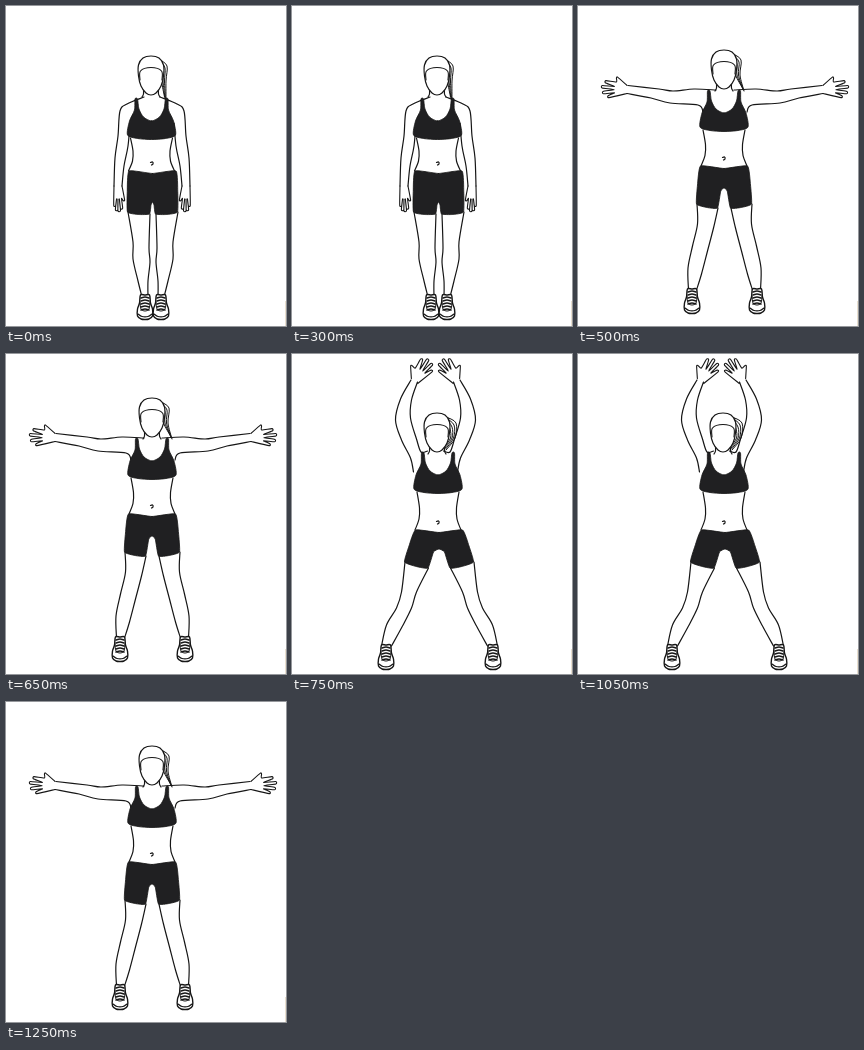
Write an HTML page with a canvas that moves like this. It is 280 px wide and 320 px high and loops after 1.5 s.

```html
<!DOCTYPE html>
<html lang="en">
<head>
<meta charset="utf-8">
<title>Jumping jack</title>
<style>
html, body { margin: 0; width: 100%; height: 100%; overflow: hidden; background: #fff; }
canvas { display: block; width: 280px; height: 320px; }
</style>
</head>
<body>
<canvas id="stage" width="280" height="320"></canvas>
<script>
const ctx = document.getElementById('stage').getContext('2d');
const INK = '#161616', CLOTH = '#202022';
const LOOP = 1500;

// Limb points are [distance from the limb's axis, y]; both sides share them.
const standing = {
  head: [145, 50], chest: [145.5, 115], hips: 165, crotch: 196,
  pony: { bulge: 16, tip: [15, 44] },
  arms: {
    axis: 146,
    outer: [[8, 91], [25, 98], [32, 105], [34, 130], [37, 152], [38, 180]],
    inner: [[22, 117], [24, 140], [28, 160], [30, 180]],
    hand: { at: [34, 180], turn: Math.PI / 2, spread: 0.45, flip: -1 }
  },
  legs: {
    axis: 147, foot: [8, 289],
    outer: [[25, 206], [20, 236], [20, 253], [15, 275], [11, 291]],
    inner: [[3, 208], [4, 242], [3, 256], [5, 275], [5, 291]]
  }
};

const halfway = {
  head: [146, 44], chest: [146, 107], hips: 160, crotch: 182,
  pony: { bulge: 17, tip: [20, 41] },
  arms: {
    axis: 147,
    outer: [[9, 84], [31, 83], [52, 85], [66, 83], [97, 79.5]],
    inner: [[22, 106], [27, 99], [55, 97], [74, 92], [98, 87.5]],
    hand: { at: [98, 83.5], turn: 0, spread: 1, flip: 1 }
  },
  legs: {
    axis: 146.5, foot: [32.5, 283],
    outer: [[27.5, 198], [27, 218], [32, 240], [36.5, 262], [36, 284]],
    inner: [[6.5, 202], [11, 222], [17, 245], [23, 268], [28, 284]]
  }
};

const raised = {
  head: [145, 59], chest: [146, 121], hips: 176, crotch: 195,
  pony: { bulge: 19, tip: [9, 37] },
  arms: {
    axis: 143.5,
    outer: [[24.5, 26], [35, 45], [40, 66], [34, 86], [25, 104], [22, 118]],
    inner: [[18, 28], [24, 46], [25, 64], [19, 85], [14.5, 98], [8, 97]],
    hand: { at: [21, 27], turn: -2.24, spread: 1, flip: -1 }
  },
  legs: {
    axis: 147.5, foot: [53.5, 291],
    outer: [[34.5, 208], [38, 238], [43, 254], [53, 271], [58, 292]],
    inner: [[11, 214], [23, 238], [28, 254], [37, 272], [48, 292]]
  }
};

// Catmull-Rom curve; a larger bend rounds the corners more.
function curve(pts, { closed = false, fill, width = 1.2, bend = 1 / 6 } = {}) {
  const n = pts.length;
  const at = i => closed ? pts[(i + n) % n] : pts[Math.max(0, Math.min(n - 1, i))];
  ctx.beginPath();
  ctx.moveTo(...pts[0]);
  for (let i = 0; i < (closed ? n : n - 1); i++) {
    const [a, b, c, d] = [at(i - 1), at(i), at(i + 1), at(i + 2)];
    ctx.bezierCurveTo(
      b[0] + (c[0] - a[0]) * bend, b[1] + (c[1] - a[1]) * bend,
      c[0] - (d[0] - b[0]) * bend, c[1] - (d[1] - b[1]) * bend,
      ...c);
  }
  if (closed) ctx.closePath();
  if (fill) { ctx.fillStyle = fill; ctx.fill(); }
  ctx.lineWidth = width;
  ctx.stroke();
}

// Closed shape from its right half.
function symmetric(half, options) {
  const left = half.filter(([x]) => x !== 0).reverse().map(([x, y]) => [-x, y]);
  curve([...half, ...left], { closed: true, ...options });
}

function place([x, y], sx, paint) {
  ctx.save();
  ctx.translate(x, y);
  ctx.scale(sx, 1);
  paint();
  ctx.restore();
}

function bothSides(at, paint) {
  place(at, -1, paint);
  place(at, 1, paint);
}

function drawHead({ bulge, tip: [tx, ty] }) {
  for (let i = 0; i < 4; i++) {
    curve([[9, 4 + i], [bulge - 2 * i, 10 + 2 * i], [bulge - 1 - 1.5 * i, 25], [tx - i / 2, ty - i]], { width: 1 });
  }
  symmetric([[0, 0], [8, 2], [12.5, 9], [12.5, 20], [10, 30], [5, 37], [0, 39]], { fill: '#fff' });
  curve([[-11, 24], [-10.5, 15], [0, 11.5], [10.5, 15], [11, 24]], { width: 1.1 });
}

function drawBra() {
  symmetric([[0, 0], [8, -4], [12.5, -12], [14, -22], [16.5, -22], [17, -11], [22, 0], [24, 14], [14, 17.5], [0, 18.5]],
    { fill: CLOTH, width: 0.8, bend: 0.13 });
}

function drawHand({ at, turn, spread, flip }) {
  const polar = (angle, r) => [r * Math.cos(angle), flip * r * Math.sin(angle)];
  const fingers = [[-0.87, 15.5]];
  for (let i = 0; i < 4; i++) fingers.push([-0.35 + 0.24 * i, 25 - 1.6 * (i - 1.2) ** 2]);

  const outline = [[0, -4 * flip]];
  fingers.forEach(([angle, length], i) => {
    const a = angle * spread;
    outline.push(polar(a - 0.05, length), polar(a + 0.05, length));
    if (i < 4) outline.push(polar((a + fingers[i + 1][0] * spread) / 2, 13));
  });
  outline.push([0, 4 * flip]);

  ctx.save();
  ctx.translate(...at);
  ctx.rotate(turn);
  curve(outline, { width: 1.1, bend: 0.1 });
  ctx.restore();
}

function drawShoe() {
  symmetric([[0, 0], [4.5, 0], [5.5, 8], [7.5, 14], [7.5, 21], [4, 24], [0, 24.5]], { fill: '#fff', width: 1.4 });
  for (let y = 2; y < 15; y += 3) curve([[-4, y + 1], [0, y], [4, y + 1]], { width: 1.5 });
  curve([[-5, 7], [-4, 14], [0, 16], [4, 14], [5, 7]], { width: 1 });
  curve([[-7, 19], [-3, 21.5], [3, 21.5], [7, 19]]);
}

function drawShorts({ hips, crotch, legs: { outer, inner } }) {
  const [ox, oy] = outer[0], [ix, iy] = inner[0];
  symmetric([[0, hips + 2.5], [23.5, hips], [(23.5 + ox) / 2 + 1, (hips + oy) / 2], [ox, oy],
    [(ox + ix) / 2, (oy + iy) / 2 + 1.5], [ix, iy], [ix / 2, crotch + 3], [0, crotch]],
    { fill: CLOTH, width: 0.8, bend: 0.07 });
}

function drawPose(pose) {
  const { head, chest, hips, arms, legs } = pose;
  ctx.fillStyle = '#fff';
  ctx.fillRect(0, 0, 280, 320);
  ctx.fillStyle = '#e9dfcf';
  ctx.fillRect(279, 295, 1, 25);
  ctx.strokeStyle = INK;
  ctx.lineCap = ctx.lineJoin = 'round';

  bothSides([arms.axis, 0], () => {
    curve(arms.outer);
    curve(arms.inner);
    drawHand(arms.hand);
  });
  bothSides([legs.axis, 0], () => {
    curve(legs.outer);
    curve(legs.inner);
    place(legs.foot, 1, drawShoe);
  });
  bothSides(chest, () => {
    const drop = hips - chest[1];
    curve([[21, 17], [18.5, drop * 0.6], [19, drop * 0.8], [23, drop]]);
  });
  bothSides(head, () => curve([[7.5, 33], [7.5, 38], [9, 41]]));

  place(head, 1, () => drawHead(pose.pony));
  place(chest, 1, drawBra);
  place([legs.axis - 0.5, 0], 1, () => drawShorts(pose));
  place([146, hips - 7.5], 1, () => curve([[-1.5, -1], [0.5, -1.5], [1, 0.5], [-0.5, 1.5]]));
}

function poseAt(ms) {
  if (ms < 500) return standing;
  if (ms < 750) return halfway;
  return ms < 1250 ? raised : halfway;
}

const began = performance.now();
function tick() {
  drawPose(poseAt((performance.now() - began) % LOOP));
  requestAnimationFrame(tick);
}
tick();
</script>
</body>
</html>
```
